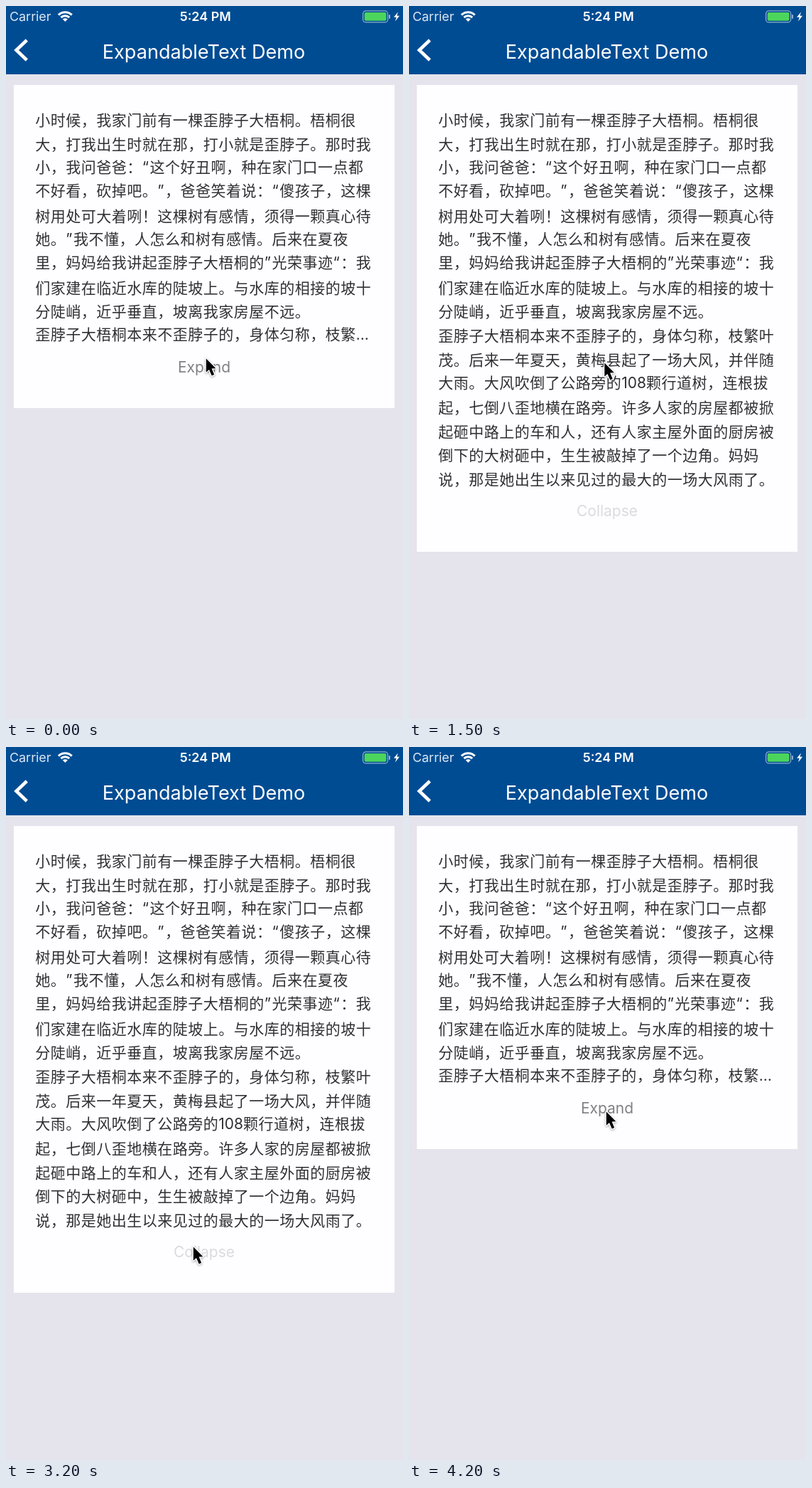
Write an HTML page with a canvas that moves like this. It is 559 px wide and 1002 px high and loops after 4.3 s.

```html
<!DOCTYPE html>
<html lang="zh-CN">
<head>
<meta charset="utf-8">
<title>ExpandableText Demo</title>
<style>
html, body { margin: 0; width: 100%; height: 100%; overflow: hidden; background: #e5e4ec; }
canvas { display: block; width: 559px; height: 1002px; }
</style>
</head>
<body>
<canvas id="stage"></canvas>
<script>
const W = 559, H = 1002, LOOP = 4300, STEP = 100;
const LATIN = 'Inter, sans-serif';
const HAN = '"Noto Sans CJK SC", "Noto Sans CJK", sans-serif';
const SIZE = 21, ADVANCE = 21.5, LEFT = 41.2;
const TOP = 160, PITCH = 33.67, LATIN_LIFT = 1.7;
const BLUE = '#004c93', GREY = '#e5e4ec', CARD = '#fefdff';
const OPEN_AT = 1500, CLOSE_AT = 3300, SHORT = 10;

const story = [
  '小时候，我家门前有一棵歪脖子大梧桐。梧桐很',
  '大，打我出生时就在那，打小就是歪脖子。那时我',
  '小，我问爸爸：“这个好丑啊，种在家门口一点都',
  '不好看，砍掉吧。”，爸爸笑着说：“傻孩子，这棵',
  '树用处可大着咧！这棵树有感情，须得一颗真心待',
  '她。”我不懂，人怎么和树有感情。后来在夏夜',
  '里，妈妈给我讲起歪脖子大梧桐的”光荣事迹“：我',
  '们家建在临近水库的陡坡上。与水库的相接的坡十',
  '分陡峭，近乎垂直，坡离我家房屋不远。',
  '歪脖子大梧桐本来不歪脖子的，身体匀称，枝繁叶',
  '茂。后来一年夏天，黄梅县起了一场大风，并伴随',
  '大雨。大风吹倒了公路旁的108颗行道树，连根拔',
  '起，七倒八歪地横在路旁。许多人家的房屋都被掀',
  '起砸中路上的车和人，还有人家主屋外面的厨房被',
  '倒下的大树砸中，生生被敲掉了一个边角。妈妈',
  '说，那是她出生以来见过的最大的一场大风雨了。'
];
const taps = [{ press: 1150, release: 1470 }, { press: 2950, release: 3170 }];
const home = { x: 281, y: 494 };
const moves = [
  { from: 0, to: 1000, x: 274.5, y: 500 },
  { from: 1600, to: 2600, x: 263, y: 701 },
  { from: 3300, to: 3850, x: 277, y: 511 }
];

const canvas = document.getElementById('stage');
const ctx = canvas.getContext('2d');
const ratio = window.devicePixelRatio || 1;
canvas.width = W * ratio;
canvas.height = H * ratio;

const progress = (t, from, to) => Math.min(1, Math.max(0, (t - from) / (to - from)));
const mix = (a, b, k) => a + (b - a) * k;

// The pointer curves: its sideways travel trails the vertical one.
function pointerAt(t) {
  let { x, y } = home;
  for (const move of moves) {
    const k = progress(t, move.from, move.to);
    const eased = k * k * (3 - 2 * k);
    x = mix(x, move.x, eased * eased);
    y = mix(y, move.y, eased);
  }
  return { x, y };
}

// A touch dims the label, letting go brings it back.
function labelAlpha(t) {
  return taps.reduce((alpha, { press, release }) => {
    const down = progress(t, press - 50, press + 100);
    const up = progress(t, release, release + 300);
    return alpha - 0.8 * down * (1 - up);
  }, 1);
}

function label(text, x, y, size, color, align = 'center', weight = 400) {
  ctx.font = `${weight} ${size}px ${LATIN}`;
  ctx.textAlign = align;
  ctx.fillStyle = color;
  ctx.fillText(text, x, y);
}

function shape(points, close) {
  ctx.beginPath();
  points.forEach(([x, y]) => ctx.lineTo(x, y));
  if (close) ctx.closePath();
}

function pill(x, y, w, h, r) {
  ctx.beginPath();
  ctx.roundRect(x, y, w, h, r);
}

// Lines holding Latin glyphs sit a little higher.
function storyLine(text, row) {
  const lift = /[\d“”…]/.test(text) ? LATIN_LIFT : 0;
  const base = TOP + row * PITCH - lift + 8;
  let x = LEFT;
  ctx.textAlign = 'left';
  ctx.fillStyle = '#303033';
  for (const part of text.match(/\d+|[^\d]/g)) {
    const digits = /\d/.test(part);
    const latin = digits || /[“”…]/.test(part);
    ctx.font = `${SIZE}px ${latin ? LATIN : HAN}`;
    ctx.fillText(part, x, base);
    if (digits) x += ctx.measureText(part).width;
    else x += latin ? ADVANCE / 2 : ADVANCE;
  }
}

function wifi(x, y) {
  ctx.save();
  shape([[x, y], [x - 16, y - 16], [x + 16, y - 16]], true);
  ctx.clip();
  ctx.strokeStyle = ctx.fillStyle = '#fff';
  ctx.lineWidth = 3;
  for (const r of [8.3, 13.3]) {
    ctx.beginPath();
    ctx.arc(x, y, r, Math.PI, 2 * Math.PI);
    ctx.stroke();
  }
  ctx.beginPath();
  ctx.arc(x, y, 4.8, Math.PI, 2 * Math.PI);
  ctx.fill();
  ctx.restore();
}

function battery() {
  ctx.strokeStyle = ctx.fillStyle = '#8fb0d0';
  ctx.lineWidth = 1.2;
  pill(502.6, 6.9, 35, 16, 4);
  ctx.stroke();
  pill(539, 12, 2, 6, 1);
  ctx.fill();
  ctx.fillStyle = '#4cd55c';
  pill(504.7, 9, 30.8, 11.8, 2);
  ctx.fill();
  ctx.fillStyle = '#fff';
  shape([[552, 8.5], [546, 15.8], [549.7, 15.8], [548, 21.5], [554, 13.8], [550.4, 13.8]], true);
  ctx.fill();
}

function header() {
  ctx.fillStyle = BLUE;
  ctx.fillRect(0, 0, W, 96);
  label('Carrier', 5, 21.3, 17.9, '#dce8f3', 'left');
  wifi(83.3, 22);
  label('5:24 PM', 280.7, 21.3, 17.9, '#fff', 'center', 600);
  battery();
  ctx.strokeStyle = '#fff';
  ctx.lineWidth = 4.6;
  ctx.lineJoin = 'miter';
  shape([[29.3, 48], [14.5, 62], [29.3, 76]]);
  ctx.stroke();
  label('ExpandableText Demo', 278.5, 73.5, 27.1, '#fff');
}

function card(open, alpha) {
  const lines = open ? story : story.slice(0, SHORT);
  if (!open) lines[SHORT - 1] = lines[SHORT - 1].slice(0, -1) + '…';
  const height = 454 + (lines.length - SHORT) * PITCH;
  ctx.fillStyle = CARD;
  ctx.fillRect(11, 111, 536, Math.round(height));
  lines.forEach(storyLine);
  ctx.globalAlpha = alpha;
  label(open ? 'Collapse' : 'Expand', 279, 60.5 + height, SIZE, '#808083');
  ctx.globalAlpha = 1;
}

function arrow(x, y) {
  ctx.save();
  ctx.translate(x, y);
  shape([[0.8, 1.5], [0.8, 20.8], [5, 16.9], [8.7, 25.4], [12.2, 23.9], [8.6, 15.6], [14.4, 15.2]], true);
  ctx.lineJoin = 'round';
  ctx.lineWidth = 2.8;
  ctx.strokeStyle = '#fff';
  ctx.shadowColor = 'rgba(0,0,0,0.35)';
  ctx.shadowBlur = 3 * ratio;
  ctx.shadowOffsetY = ratio;
  ctx.stroke();
  ctx.shadowColor = 'transparent';
  ctx.fillStyle = '#000';
  ctx.fill();
  ctx.restore();
}

function ring(x, y) {
  ctx.strokeStyle = '#000';
  ctx.lineWidth = 2.4;
  ctx.beginPath();
  ctx.arc(x, y, 33.7, 0, 2 * Math.PI);
  ctx.stroke();
}

function draw(t) {
  const { x, y } = pointerAt(t);
  ctx.setTransform(ratio, 0, 0, ratio, 0, 0);
  ctx.fillStyle = GREY;
  ctx.fillRect(0, 0, W, H);
  header();
  card(t >= OPEN_AT && t < CLOSE_AT, labelAlpha(t));
  if (taps.some(tap => t >= tap.press && t < tap.release)) ring(x - 0.5, y + 2.5);
  arrow(x, y);
}

const start = performance.now();
function tick() {
  const t = (performance.now() - start) % LOOP;
  draw(Math.floor(t / STEP) * STEP);
  requestAnimationFrame(tick);
}
tick();
</script>
</body>
</html>
```
